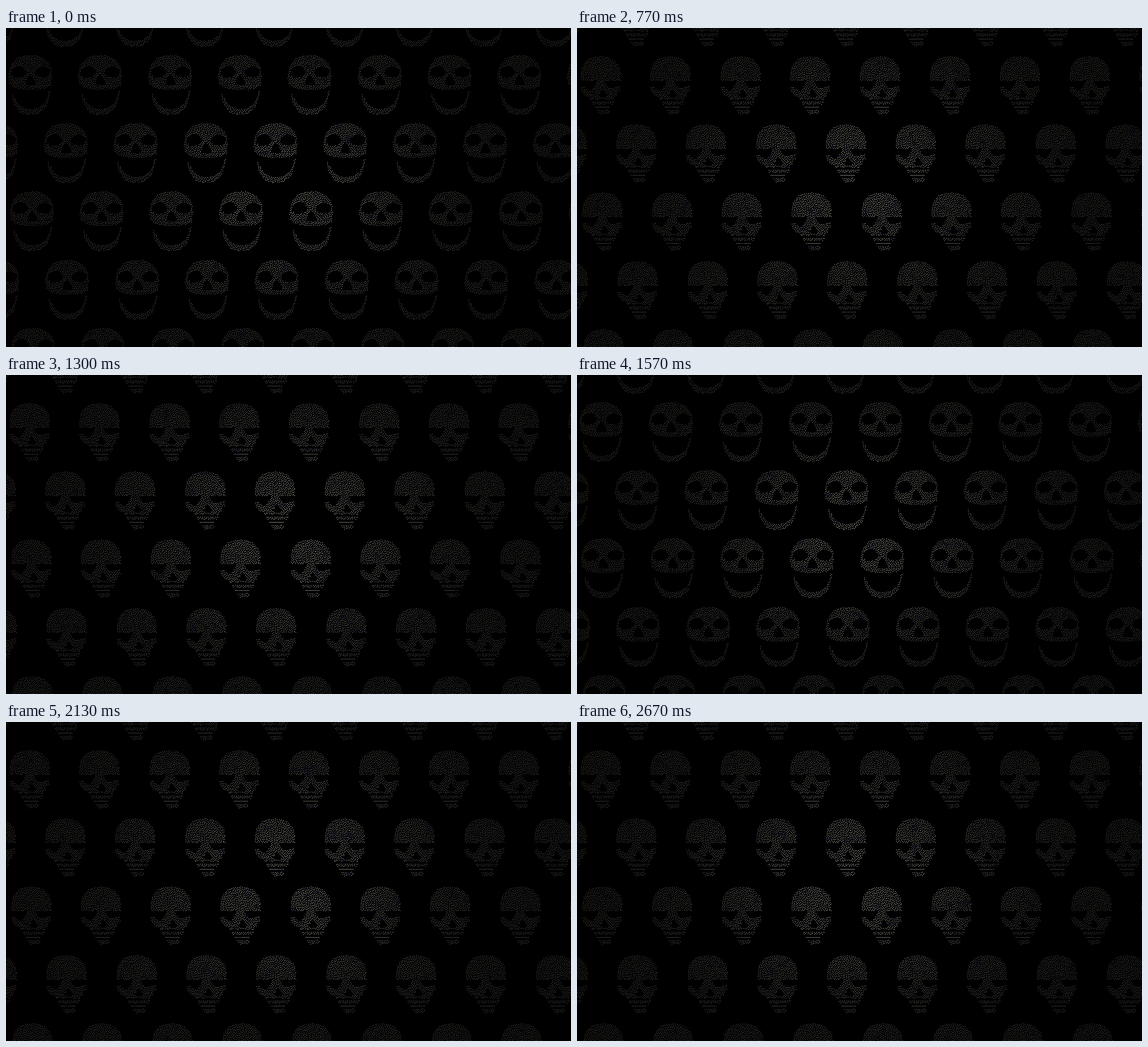
These frames come from a looping animation (997x562 px, 2.71 s). An HTML page with a canvas:

```html
<!DOCTYPE html>
<html lang="en">
<head>
<meta charset="utf-8">
<title>Dotted skulls</title>
<style>
  html, body { margin: 0; width: 100%; height: 100%; overflow: hidden; background: #000; }
  canvas { display: block; }
</style>
</head>
<body>
<canvas id="stage" width="997" height="562"></canvas>
<script>
const W = 997, H = 562, LOOP = 2710, STEPS = 81;
const ctx = document.getElementById('stage').getContext('2d');
const image = ctx.createImageData(W, H);
const pixels = new Uint32Array(image.data.buffer);

// Outlines relative to the top centre of the closed skull; inner loops are holes.
const CLOSED = `M-35 43C-38 20-28 0 0 0C28 0 38 20 35 43Z
  M-35 55L-28 54Q-23 63-16 60Q-9 53-7 43L8 43Q10 54 18 56L35 52Q36 62 30 67L24 76L-18 76L-29 68Q-36 62-35 55Z
  M4 59L-4 69Q4 76 12 69Z
  M-16 80H25L22 85H-13Z
  M-8 95H18L13 102H-2Z`;
const OPEN = `M-37 40C-38 12-24-2 2-2C28-2 40 12 40 40L38 52Q30 58 22 58L-16 58Q-32 56-36 48Z
  M-33 29Q-30 18-19 18Q-10 18-6 27Q-8 38-20 38Q-31 38-33 29Z
  M9 27Q13 18 23 18Q34 18 36 28Q34 38 23 38Q12 38 9 27Z
  M2 33Q-8 44-6 50Q2 54 10 50Q12 44 2 33Z
  M-32 66C-30 92-16 104 2 104C22 104 36 90 36 62L33 62C32 82 20 93 2 93C-14 93-24 82-29 66Z`;

function hash(a, b, c) {
  let h = Math.imul(a + 101, 374761393) ^ Math.imul(b + 57, 668265263) ^ Math.imul(c + 13, 2147483647);
  h = Math.imul(h ^ (h >>> 13), 1274126177);
  h = Math.imul(h ^ (h >>> 16), 2246822519);
  return ((h ^ (h >>> 15)) >>> 0) / 4294967296;
}

// Fill an outline with evenly scattered dots by error diffusion.
function stipple(outline) {
  const path = new Path2D(outline), dots = [];
  let above = new Float32Array(90);
  for (let y = -4; y <= 105; y++) {
    const below = new Float32Array(90);
    let carry = 0;
    for (let x = -42; x <= 44; x++) {
      const i = x + 43;
      let error = hash(x, y, 1) * 0.4;
      if (ctx.isPointInPath(path, x, y, 'evenodd')) {
        error = 0.115 + above[i] + carry;
        if (error > 0.42 + hash(x, y, 2) * 0.16) {
          dots.push([x, y]);
          error -= 1;
        }
      }
      carry = error * 7 / 16;
      below[i - 1] += error * 3 / 16;
      below[i] += error * 5 / 16;
      below[i + 1] += error / 16;
    }
    above = below;
  }
  return dots;
}

function light(x, y) {
  return 0.38 + 0.62 * Math.exp(-(((x - 490) / 225) ** 2) - ((y - 275) / 195) ** 2);
}

// Repeat one skull over the staggered rows.
function tile(dots) {
  const field = [];
  for (let row = 0; row < 6; row++) {
    for (let col = -1; col < 9; col++) {
      const cx = Math.round(41 + 123.3 * col + (row % 2 ? 0 : 61.7) + 1.25 * (row - 1));
      const top = Math.round(49 + 120.2 * (row - 1));
      for (const [dx, dy] of dots) {
        const x = cx + dx, y = top + dy;
        if (x >= 0 && x < W && y >= 0 && y < H) field.push({ x, y, glow: light(x, y) });
      }
    }
  }
  return field;
}

const closedDots = stipple(CLOSED);
for (let x = -9; x <= 15; x += 2) closedDots.push([x, 90]);
const closedField = tile(closedDots);
const openField = tile(stipple(OPEN));

function rgb(r, g, b, glow) {
  return (255 << 24 | (b * glow) << 16 | (g * glow) << 8 | (r * glow)) >>> 0;
}

function draw(now) {
  const time = now % LOOP;
  const step = Math.floor(time / LOOP * STEPS);
  const field = time % (LOOP / 2) < LOOP / 4 ? openField : closedField;
  pixels.fill(0xff000000);
  for (const { x, y, glow } of field) {
    const blue = hash(x >> 3, y >> 3, step) < 0.16 && hash(x, y, step) < 0.6;
    pixels[y * W + x] = blue ? rgb(160, 160, 225, glow) : rgb(246, 246, 232, glow);
  }
  ctx.putImageData(image, 0, 0);
  requestAnimationFrame(() => draw(performance.now() - start));
}

const start = performance.now();
draw(0);
</script>
</body>
</html>
```
